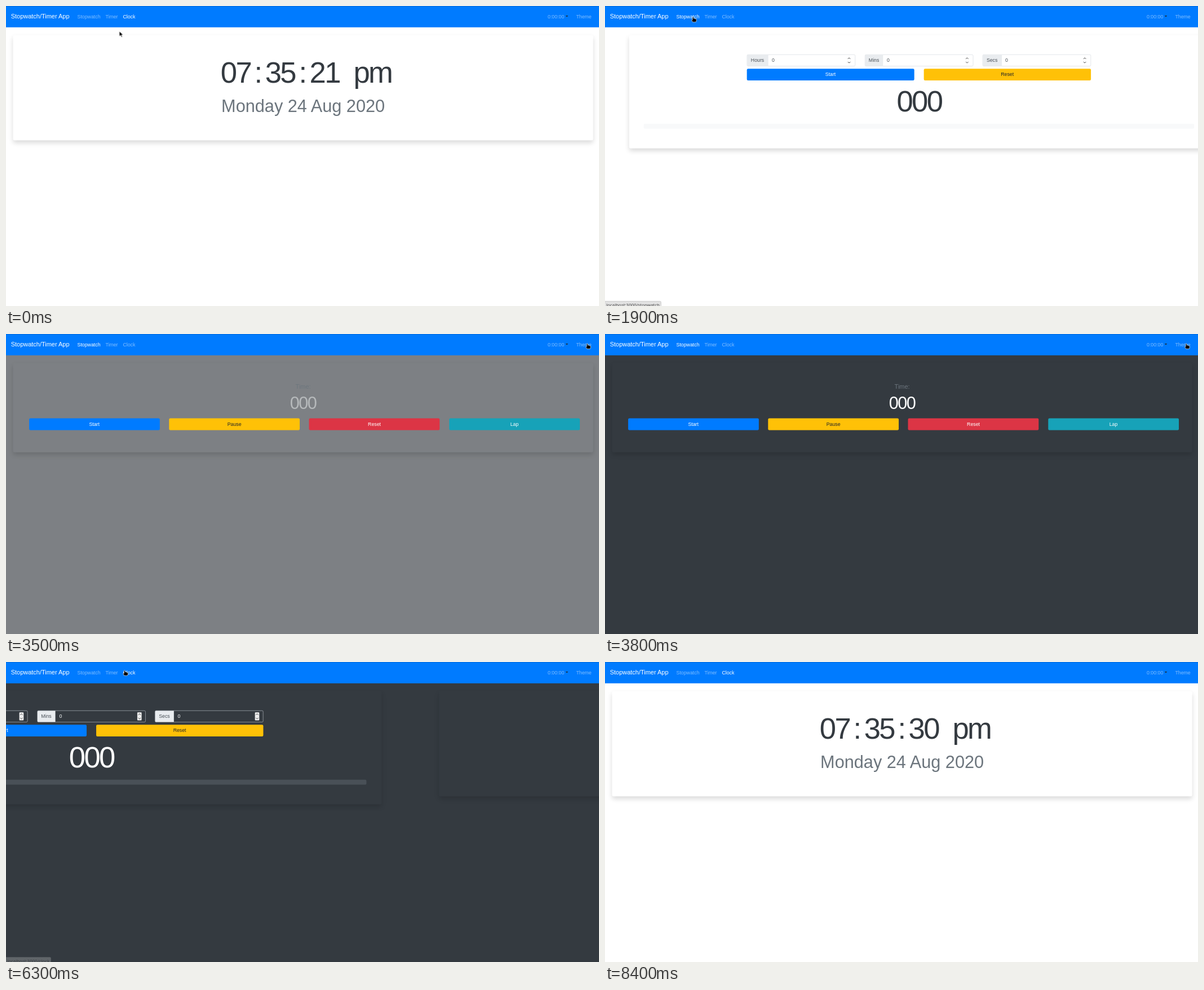
These frames come from a looping animation (1052 by 532 pixels, 9000 ms). An HTML page:

```html
<!DOCTYPE html>
<html lang="en">
<head>
<meta charset="utf-8">
<title>Stopwatch/Timer App</title>
<style>
@property --bg { syntax: "<color>"; inherits: true; initial-value: #fff; }
@property --fg { syntax: "<color>"; inherits: true; initial-value: #343a40; }
@property --bar { syntax: "<color>"; inherits: true; initial-value: #f8f9fa; }
@property --spin { syntax: "<color>"; inherits: true; initial-value: #fff; }
@property --value { syntax: "<color>"; inherits: true; initial-value: #495057; }

html, body { margin: 0; width: 100%; height: 100%; overflow: hidden; }
body {
  background: var(--bg);
  font: 16px "Liberation Sans", Arial, sans-serif;
  animation: theme 9s infinite;
}
.stage {
  position: absolute; left: 0; top: 0; width: 1920px; height: 971px;
  overflow: hidden;
  transform: scale(calc(1052 / 1920)); transform-origin: 0 0;
}
.stage * { position: absolute; box-sizing: border-box; white-space: pre; }

/* Navigation bar */
nav {
  left: 0; top: 0; width: 1920px; height: 69px; line-height: 69px;
  background: #007bff; box-shadow: inset 0 2px rgba(0, 0, 0, .13);
  color: rgba(255, 255, 255, .5);
}
nav span { top: 0; }
.brand { left: 16px; font-size: 20px; color: #fff; }
.caret {
  left: 1811.5px; top: 31.2px;
  border: 4.8px solid transparent; border-top-color: #212529; border-bottom: 0;
}
.link { animation: 9s step-end infinite; }
.to-stopwatch { animation-name: link-stopwatch; }
.to-timer { animation-name: link-timer; }
.to-clock { animation-name: link-clock; }

/* Pages lie side by side on one sliding track */
.track { left: 0; top: 0; animation: slide 9s ease-in-out infinite; }
.page { top: 0; width: 1920px; height: 971px; }
.card {
  left: 23px; top: 93.5px; width: 1878px; border-radius: 5px;
  background: var(--bg); box-shadow: 0 8px 16px rgba(0, 0, 0, .15);
}
.mid { left: 23px; width: 1878px; text-align: center; }
.big { font-size: 96px; line-height: 115px; letter-spacing: -.05em; color: var(--fg); }
.small { font-size: 56px; line-height: 67px; }
.tight { letter-spacing: -.05em; color: var(--fg); }
.muted { color: #6c757d; }
.btn {
  left: var(--x); width: var(--w); height: 38px; line-height: 38px;
  border-radius: 4px; text-align: center; color: #fff;
}
.blue { background: #007bff; }
.yellow { background: #ffc107; color: #212529; }
.red { background: #dc3545; }
.teal { background: #17a2b8; }
.field {
  left: var(--x); top: 157px; width: 351px; height: 38px; line-height: 36px;
  border: 1px solid #ced4da; border-radius: 4px; display: flex; color: var(--value);
}
.field * { position: static; }
.field b {
  font-weight: 400; padding: 0 12px; background: #e9ecef; color: #495057;
  border-right: 1px solid #ced4da; border-radius: 3px 0 0 3px;
}
.field span { padding-left: 12px; }
.field svg { position: absolute; right: 12px; top: 5px; width: 14px; height: 26px; background: var(--spin); border-radius: 2px; }
.progress { left: 70px; top: 381px; width: 1782px; height: 16px; border-radius: 4px; background: var(--bar); }

/* Link address in the corner */
.status {
  left: -1px; top: 955px; height: 24px; line-height: 24px; padding: 0 4px;
  font-family: "Noto Sans", "Open Sans", sans-serif; font-size: 14.4px;
  color: #444; background: #e1e1e1; border: 1px solid #b4b4b4; border-top-right-radius: 4px;
  opacity: 0; animation: 9s linear infinite;
}
.s-stopwatch { animation-name: status-stopwatch; }
.s-timer { animation-name: status-timer; }
.s-clock { animation-name: status-clock; }

/* Pointer */
.pointer { left: 0; top: 0; animation: move 9s linear infinite; }
.pointer svg { overflow: visible; left: 0; top: 0; width: 20px; height: 20px; stroke: #fff; stroke-width: 1.2; }
.arrow { animation: arrow 9s step-end infinite; }
.hand { animation: hand 9s step-end infinite; }

@keyframes theme {
  0%, 37.656% { --bg: #fff; --fg: #343a40; --bar: #f8f9fa; --spin: #fff; --value: #495057; animation-timing-function: ease; }
  40.989%, 89.889% { --bg: #343a40; --fg: #fff; --bar: #495057; --spin: #eee; --value: #f8f9fa; animation-timing-function: ease; }
  93.222%, 100% { --bg: #fff; --fg: #343a40; --bar: #f8f9fa; --spin: #fff; --value: #495057; }
}
@keyframes slide {
  0%, 8.889% { transform: translateX(-4128px); }
  12.667%, 20.683% { transform: translateX(-2064px); }
  24.461%, 56.222% { transform: translateX(0); }
  60%, 68.5% { transform: translateX(-2064px); }
  72.278%, 100% { transform: translateX(-4128px); }
}
@keyframes link-stopwatch {
  0% { color: rgba(255, 255, 255, .5); }
  16.2% { color: rgba(255, 255, 255, .75); }
  20.678% { color: #fff; }
  56.222%, 100% { color: rgba(255, 255, 255, .5); }
}
@keyframes link-timer {
  0% { color: rgba(255, 255, 255, .5); }
  5% { color: rgba(255, 255, 255, .75); }
  8.889% { color: #fff; }
  20.678% { color: rgba(255, 255, 255, .5); }
  53% { color: rgba(255, 255, 255, .75); }
  56.222% { color: #fff; }
  68.5%, 100% { color: rgba(255, 255, 255, .5); }
}
@keyframes link-clock {
  0% { color: #fff; }
  8.889% { color: rgba(255, 255, 255, .5); }
  63.8% { color: rgba(255, 255, 255, .75); }
  68.5%, 100% { color: #fff; }
}
@keyframes status-stopwatch {
  0%, 16.6% { opacity: 0; }
  17.2%, 21.1% { opacity: 1; }
  22.7%, 100% { opacity: 0; }
}
@keyframes status-timer {
  0%, 5.4% { opacity: 0; }
  6%, 9.3% { opacity: 1; }
  11%, 53.4% { opacity: 0; }
  54%, 56.6% { opacity: 1; }
  58.3%, 100% { opacity: 0; }
}
@keyframes status-clock {
  0%, 64.4% { opacity: 0; }
  65%, 68.9% { opacity: 1; }
  70.4%, 100% { opacity: 0; }
}
@keyframes move {
  0%, 1.7% { transform: translate(367px, 82px); }
  5.5%, 13.9% { transform: translate(340px, 35px); }
  16.7%, 21.7% { transform: translate(285px, 35px); }
  25.5% { transform: translate(820px, 350px); }
  26.7% { transform: translate(1130px, 200px); }
  27.75%, 29.5% { transform: translate(1444px, 82px); }
  33.3%, 42.8% { transform: translate(1882px, 31px); }
  46.7% { transform: translate(1300px, 40px); }
  53.3%, 61.7% { transform: translate(332px, 24px); }
  64.4%, 73.4% { transform: translate(384px, 27px); }
  74.4% { transform: translate(700px, 36px); }
  77.7%, 80.2% { transform: translate(1506px, 34px); }
  81.1%, 83.4% { transform: translate(1781px, 29px); }
  84.4% { transform: translate(1835px, 28px); }
  86.6%, 100% { transform: translate(1851px, 27px); }
}
@keyframes arrow {
  0% { opacity: 1; }
  5% { opacity: 0; }
  22.3% { opacity: 1; }
  32.3% { opacity: 0; }
  43% { opacity: 1; }
  52.8% { opacity: 0; }
  73.7% { opacity: 1; }
  81.1%, 100% { opacity: 0; }
}
@keyframes hand {
  0% { opacity: 0; }
  5% { opacity: 1; }
  22.3% { opacity: 0; }
  32.3% { opacity: 1; }
  43% { opacity: 0; }
  52.8% { opacity: 1; }
  73.7% { opacity: 0; }
  81.1% { opacity: 1; }
  93.3%, 100% { opacity: 0; }
}
</style>
</head>
<body>
<div class="stage">
  <div class="track">
    <section class="page" style="left:0">
      <div class="card" style="height:289.5px"></div>
      <div class="mid muted" style="top:154.7px;font-size:20px;line-height:30px">Time:</div>
      <div class="mid small tight" style="top:189.5px">000</div>
      <div class="btn blue" style="--x:74.5px;--w:423px;top:273px">Start</div>
      <div class="btn yellow" style="--x:528px;--w:423px;top:273px">Pause</div>
      <div class="btn red" style="--x:981.3px;--w:423px;top:273px">Reset</div>
      <div class="btn teal" style="--x:1434.7px;--w:423px;top:273px">Lap</div>
    </section>

    <section class="page" style="left:2064px">
      <div class="card" style="height:367.5px"></div>
      <div class="field" style="--x:404px"><b>Hours</b><span>0</span></div>
      <div class="field" style="--x:785.5px"><b>Mins</b><span>0</span></div>
      <div class="field" style="--x:1167px"><b>Secs</b><span>0</span></div>
      <div class="btn blue" style="--x:404px;--w:541.5px;top:203px">Start</div>
      <div class="btn yellow" style="--x:976.5px;--w:541.5px;top:203px">Reset</div>
      <div class="mid big" style="top:250px">000</div>
      <div class="progress"></div>
    </section>

    <section class="page" style="left:4128px">
      <div class="card" style="height:341.5px"></div>
      <div class="big" style="left:695px;top:158px">07</div>
      <div class="big" style="left:804px;top:158px">:</div>
      <div class="big" style="left:839px;top:158px">35</div>
      <div class="big" style="left:948px;top:158px">:</div>
      <div class="big" id="secs" style="left:983px;top:158px">21</div>
      <div class="big" style="left:1125px;top:158px">pm</div>
      <div class="mid small muted" style="top:289.5px">Monday 24 Aug 2020</div>
    </section>
  </div>

  <nav>
    <span class="brand">Stopwatch/Timer App</span>
    <span class="link to-stopwatch" style="left:231px">Stopwatch</span>
    <span class="link to-timer" style="left:322px">Timer</span>
    <span class="link to-clock" style="left:378.5px">Clock</span>
    <span style="left:1754px">0:00:00</span>
    <i class="caret"></i>
    <span style="left:1846px">Theme</span>
  </nav>

  <div class="status s-stopwatch">localhost:3000/stopwatch</div>
  <div class="status s-timer">localhost:3000/timer</div>
  <div class="status s-clock">localhost:3000/clock</div>

  <div class="pointer">
    <svg class="arrow" viewBox="0 0 20 20"><path d="M0 0V16L4 12.5L7 19L9.6 18L6.8 11.5H12Z"/></svg>
    <svg class="hand" viewBox="0 0 20 20"><path d="M-2 1Q0-1 2 1V5Q4 4 5 6Q7 5 8 7Q11 6 11 9V13L9 17H-1L-5 11Q-5 8-2 10Z"/></svg>
  </div>
</div>
<script>
const LOOP = 9000;
const secs = document.getElementById("secs");
const SVG = '<svg viewBox="0 0 14 26"><path d="M3 8.5L7 4.5L11 8.5M3 17.5L7 21.5L11 17.5" fill="none" stroke="#444" stroke-width="1.8"/></svg>';
document.querySelectorAll(".field").forEach(f => f.insertAdjacentHTML("beforeend", SVG));

let start;
function tick(now) {
  start ??= now;
  const t = (now - start) % LOOP;
  const text = String(Math.floor(21.7 + t / 1000));
  if (secs.textContent !== text) secs.textContent = text;
  requestAnimationFrame(tick);
}
requestAnimationFrame(tick);
</script>
</body>
</html>
```
